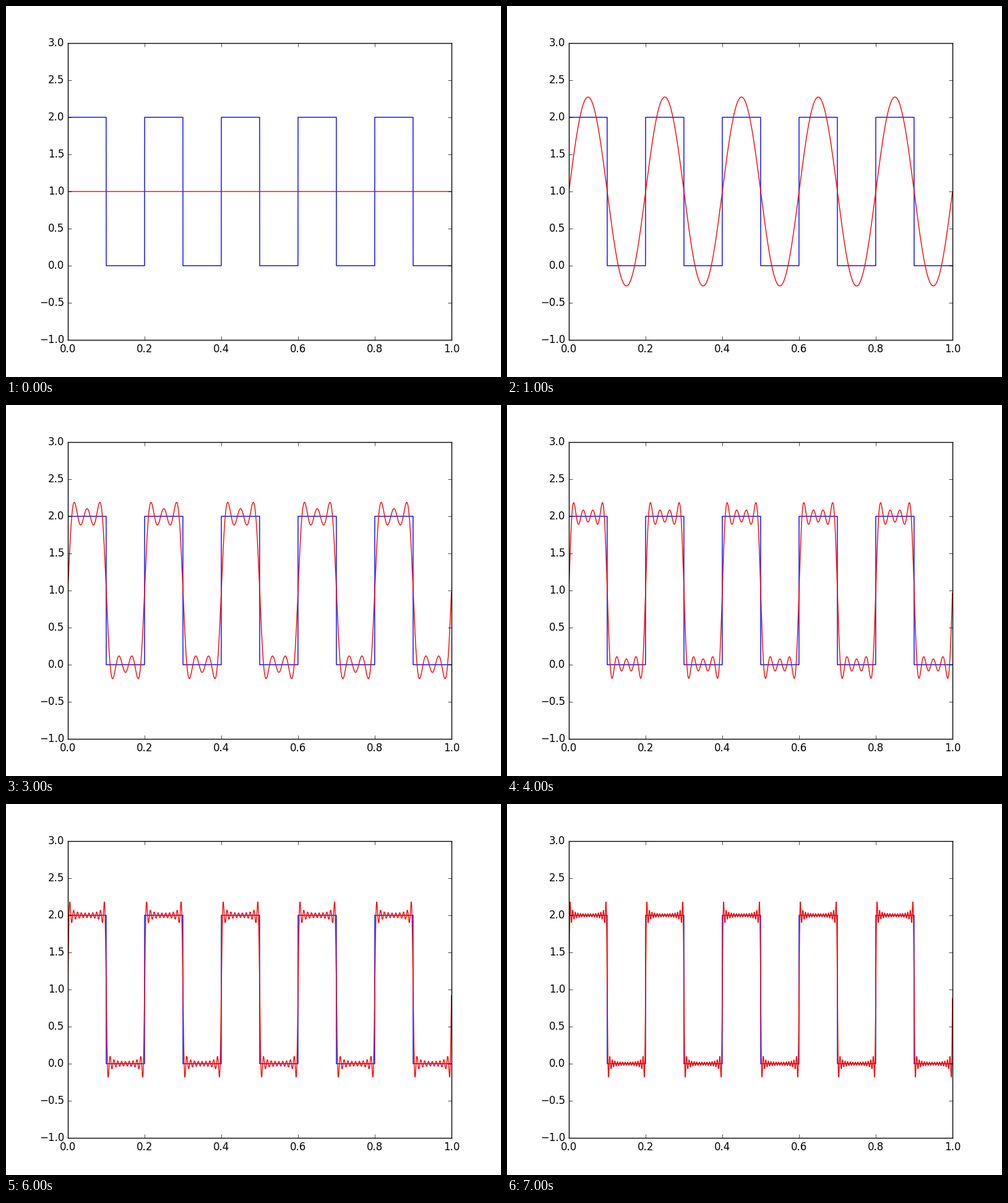
A matplotlib script for the animation above (8000 ms loop, 800 px wide and 600 px high).

```python
import numpy as np
import matplotlib.pyplot as plt
from matplotlib.animation import FuncAnimation

plt.style.use("classic")
plt.rcParams["font.family"] = "DejaVu Sans"

FREQ = 5
TERMS = [0, 1, 2, 3, 4, 5, 10, 15]
SAMPLES = 5000

index = np.arange(SAMPLES)
t = index / SAMPLES
half_period = SAMPLES // (2 * FREQ)
square = np.where(index // half_period % 2 == 0, 2.0, 0.0)


def partial_sum(terms):
    """Fourier series of the square wave, cut after some odd harmonics."""
    total = np.ones(SAMPLES)
    for n in range(1, 2 * terms, 2):
        total += 4 / (np.pi * n) * np.sin(2 * np.pi * FREQ * n * t)
    return total


fig = plt.figure(figsize=(8, 6), dpi=100, facecolor="white")
ax = fig.add_subplot(111)
ax.plot(t, square, color="blue", linewidth=1)
series, = ax.plot(t, partial_sum(0), color="red", linewidth=1)
ax.set_xlim(0, 1)
ax.set_ylim(-1, 3)
ax.set_xticks(np.linspace(0, 1, 6))
ax.set_yticks(np.linspace(-1, 3, 9))


def update(frame):
    series.set_ydata(partial_sum(TERMS[frame]))
    return series,


anim = FuncAnimation(fig, update, frames=len(TERMS), interval=1000,
                     repeat=True, repeat_delay=0)
plt.show()
```
